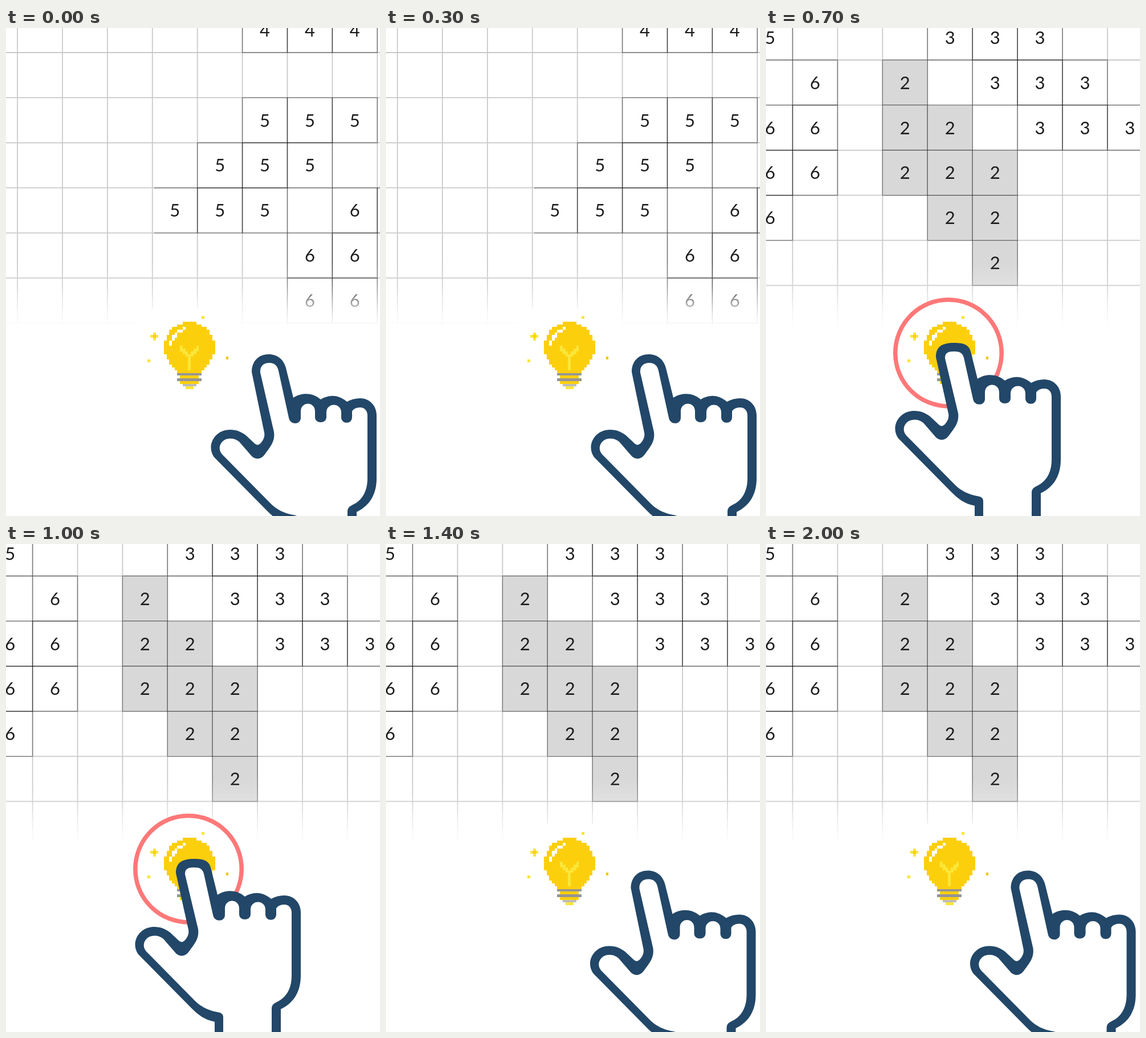
Recreate the animation shown at these times as an HTML page. Size 656 px wide and 854 px high, loop 2.4 s.

```html
<!DOCTYPE html>
<html lang="en">
<head>
<meta charset="utf-8">
<title>Hint button</title>
<style>
html, body { margin: 0; width: 100%; height: 100%; overflow: hidden; background: #fff; }
svg { display: block; width: 656px; height: 854px; }
text { font: 31px Lato, sans-serif; fill: #1c1c1c; text-anchor: middle; }
.grid { stroke: #000; stroke-opacity: .21; stroke-width: 1.8; fill: none; }
.edge { stroke: #000; stroke-opacity: .42; stroke-width: 1.4; fill: none; }
</style>
</head>
<body>
<svg viewBox="0 0 656 854">
  <defs>
    <linearGradient id="fade" gradientUnits="userSpaceOnUse" x1="0" y1="410" x2="0" y2="526">
      <stop offset="0" stop-color="#fff" stop-opacity="0"/>
      <stop offset=".34" stop-color="#fff" stop-opacity=".2"/>
      <stop offset=".58" stop-color="#fff" stop-opacity=".55"/>
      <stop offset=".78" stop-color="#fff" stop-opacity=".82"/>
      <stop offset="1" stop-color="#fff"/>
    </linearGradient>
  </defs>
  <g id="boards"></g>
  <rect y="410" width="656" height="444" fill="url(#fade)"/>
  <rect x="232" y="490" width="180" height="40" fill="#fff"/>
  <g id="bulb" shape-rendering="crispEdges"></g>
  <circle id="ring" cx="320" cy="568.7" r="93.2" fill="none" stroke="#fd7879" stroke-width="7.5"/>
  <g id="hand">
    <path id="outer" fill="#224768"/>
    <path id="inner" fill="#fff"/>
  </g>
</svg>
<script>
const NS = 'http://www.w3.org/2000/svg';
const $ = id => document.getElementById(id);

function add(parent, tag, attrs, text) {
  const el = document.createElementNS(NS, tag);
  for (const k in attrs) el.setAttribute(k, attrs[k]);
  if (text) el.textContent = text;
  return parent.appendChild(el);
}

// Puzzle boards
const CELL = 78.9;

function board(x0, y0, rows, shaded, openCell) {
  const g = add($('boards'), 'g', {});
  let lines = '';
  for (let i = 0; i < 10; i++) {
    lines += `M${x0 + i * CELL} 0V530`;
    if (i < 8) lines += `M0 ${y0 + i * CELL}H656`;
  }
  add(g, 'path', { d: lines, class: 'grid' });
  rows.forEach((row, r) => [...row].forEach((digit, c) => {
    if (digit === '.') return;
    const x = x0 + c * CELL, y = y0 + r * CELL;
    if (digit === shaded) add(g, 'rect', { x, y, width: CELL, height: CELL, fill: '#d8d8d8' });
    const d = openCell === c + ',' + r
      ? `M${x + 3} ${y}h${CELL - 3}v${CELL}h${3 - CELL}`
      : `M${x} ${y}h${CELL}v${CELL}h${-CELL}z`;
    add(g, 'path', { d, class: 'edge' });
    add(g, 'text', { x: x + CELL / 2, y: y + CELL / 2 + 11.2 }, digit);
  }));
  return g;
}

const before = board(-58.8, -35.9, [
  '......444.',
  '..........',
  '......555.',
  '.....555..',
  '....555.66',
  '.......66.',
  '.......66.'
], '', '4,4');

const after = board(-32.3, -22.9, [
  '5...333..',
  '.6.2.333.',
  '66.22.333',
  '66.222...',
  '6...22...',
  '.....2...'
], '2');

// Pixel light bulb
const PX = 4.73, GOLD = '#fccf0d', LEMON = '#fbe638', GREY = '#969696';

function px(c, r, w, h, fill) {
  add($('bulb'), 'rect', { x: 276.8 + c * PX, y: 513.8 + r * PX, width: w * PX, height: h * PX, fill });
}

// Mirrored bands: [first row, row count, width]
[[0, 1, 5], [1, 1, 9], [2, 1, 13], [3, 2, 15], [5, 2, 17], [7, 5, 19],
 [12, 2, 17], [14, 2, 15], [16, 1, 13], [17, 1, 11], [18, 1, 9], [20, 1, 7], [22, 1, 7]]
  .forEach(([r, h, w]) => px((19 - w) / 2, r, w, h, GOLD));
px(5, 19, 9, 1, GREY);
px(5, 21, 9, 1, GREY);
px(7, 23, 5, 1, '#bdbdbd');
px(8, 24, 3, 1, LEMON);

for (let i = 0; i < 3; i++) {
  px(6 + i, 9 + i, 1, 2, LEMON);
  px(12 - i, 9 + i, 1, 2, LEMON);
}
px(9, 12, 1, 6, LEMON);

[[7, 2, 1, 1], [5, 3, 2, 1], [4, 4, 1, 1], [3, 5, 1, 2], [4, 5, 1, 1], [2, 7, 1, 2]]
  .forEach(p => px(...p, '#fff'));

// Sparkles
px(14, -2, 1, 1, LEMON);
px(-5, 5, 3, 1, LEMON);
px(-4, 4, 1, 3, LEMON);
px(-4, 5, 1, 1, GOLD);
px(-6, 14, 1, 1, LEMON);
px(23, 13, 1, 1, '#f6c40c');

// Hand: only the fingertip differs when pressed
const TIP = {
  up: [
    'M298 569C298 550 310 538 328 538C343 538 354 547 358 562',
    'M313 570C312 560 318 553 329 553C338 553 343 558 345 567'
  ],
  down: [
    'M298 576C298 558 308 551 330 551C348 551 356 555 359 566',
    'M314 578C314 569 318 566 330 566C340 566 345 569 347 577'
  ]
};
const OUTER = 'L371 614C384 605 404 604 419 617C433 608 450 608 465 621' +
  'C472 617 480 615 488 615C505 615 517 628 517 645V755C517 783 505 803 482 814V870H366V836' +
  'C349 833 337 824 325 812L232 718C218 699 232 670 260 670C272 670 280 674 288 680' +
  'L303 694C307 698 311 697 315 692C320 686 321 680 320 675Z';
const INNER = 'L363 649C365 662 384 662 384 649V638C384 620 409 620 409 638V648' +
  'C409 660 429 660 429 648V640C429 622 455 622 455 640V648C455 661 474 661 474 648V638' +
  'C476 634 481 631 488 631C496 631 501 637 501 645V755C501 780 490 795 474 802' +
  'C468 805 466 808 466 814V870H381V828C381 822 377 820 370 819C355 816 342 810 332 800' +
  'L246 713C238 704 242 692 252 687C262 684 270 686 276 691L296 714' +
  'C303 723 314 723 321 713C332 698 339 690 337 674Z';

const LOOP = 2400;
const steps = [
  { end: 500,  hand: [133, 33] },
  { end: 700,  hand: [0, 0] },
  { end: 1200, hand: [0, 0], pressed: true, solved: true },
  { end: 1400, hand: [0, 0], solved: true },
  { end: LOOP, hand: [131.5, 33.5], solved: true }
];

const show = (el, on) => el.setAttribute('visibility', on ? 'visible' : 'hidden');

function draw(t) {
  const s = steps.find(step => t < step.end);
  show(before, !s.solved);
  show(after, s.solved);
  show($('ring'), s.pressed);
  $('hand').setAttribute('transform', `translate(${s.hand})`);
  const [out, inn] = s.pressed ? TIP.down : TIP.up;
  $('outer').setAttribute('d', out + OUTER);
  $('inner').setAttribute('d', inn + INNER);
}

const start = performance.now();
function tick() {
  draw((performance.now() - start) % LOOP);
  requestAnimationFrame(tick);
}
tick();
</script>
</body>
</html>
```
